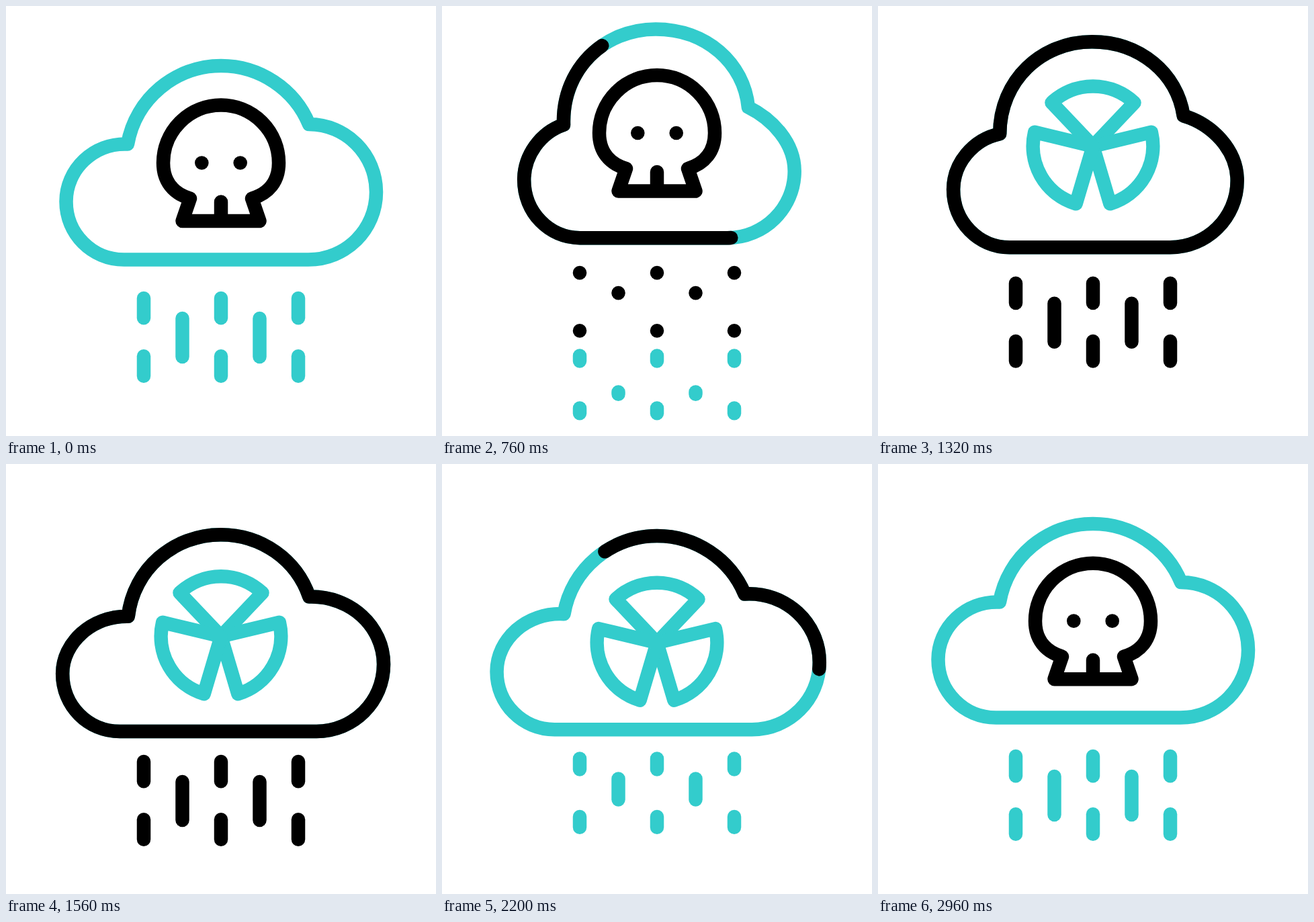
These frames come from a looping animation (640 by 640 pixels, 3000 ms). An HTML page:

```html
<!DOCTYPE html>
<html lang="en">
<head>
<meta charset="utf-8">
<title>Toxic rain</title>
<style>
  html, body { margin: 0; width: 100%; height: 100%; overflow: hidden; background: #fff; }
  svg { display: block; width: 100%; height: 100%; }
  .line { fill: none; stroke-width: 20.5; stroke-linecap: round; stroke-linejoin: round; }
  .teal { stroke: #3cc; }
  .black { stroke: #000; }
</style>
</head>
<body>
<svg viewBox="0 0 640 640">
  <clipPath id="inside"><path class="cloud"/></clipPath>
  <g clip-path="url(#inside)">
    <g id="skull" class="line black">
      <path d="M274 286.5C249 279 234 261 234 233.5A86 86 0 0 1 406 233.5C406 261 391 279 366 286.5L377.5 320H262.5ZM320 291.5V320"/>
      <g fill="#000" stroke="none"><circle cx="291.3" cy="233.5" r="10.3"/><circle cx="348.7" cy="233.5" r="10.3"/></g>
    </g>
    <g id="trefoil" class="line teal">
      <path id="blade" d="M320 235L258.5 170.2A89.5 89.5 0 0 1 381.5 170.2Z"/>
      <use href="#blade" transform="rotate(120 320 235)"/>
      <use href="#blade" transform="rotate(240 320 235)"/>
    </g>
  </g>
  <path class="cloud line teal"/>
  <path id="trace" class="cloud line black" pathLength="1"/>
  <g id="rain"></g>
</svg>
<script>
const LOOP = 3000;
const find = id => document.getElementById(id);
const mix = (a, b, p) => a + (b - a) * p;
const ease = (t, from, to) => {
  const u = Math.min(1, Math.max(0, (t - from) / (to - from)));
  return u * u * (3 - 2 * u);
};

// Cloud outlines share one structure, so their numbers can be blended.
const REST = 'M450 377.5H175.5C128 377.5 89.5 339 89.5 291C89.5 243.5 130 203.5 181 205.5C193 138 252 89 320 89C377 89 429 123 451 176C506 176 551 221 551 277C551 333 506 377.5 450 377.5Z';
const TALL = 'M424 344.3H206C160 344.3 123 306 123 258C123 222 147 188 181 176C178 93 241 33 318 33C394 33 450 84 456 150C491 168 524 203 524 245C524 300 479 344.3 424 344.3Z';
const WIDE = 'M472 412H160C112 412 74 374 74 326C74 278 122 236 182 240C193 173 252 124 320 124C377 124 428 158 450 210C518 203 572 252 572 312C572 368 527 412 472 412Z';
const NUMBER = /[\d.]+/g;

function blend(a, b, p) {
  const goal = b.match(NUMBER);
  let i = 0;
  return a.replace(NUMBER, n => mix(+n, +goal[i++], p).toFixed(2));
}

const squash = t => ease(t, 1138, 1735);
const relax = t => ease(t, 1930, 2480);

function cloudPath(t) {
  if (t < 1000) return blend(REST, TALL, ease(t, 330, 805));
  if (t < 1800) return blend(TALL, WIDE, squash(t));
  return blend(WIDE, REST, relax(t));
}

// Black outline: grows around the cloud, later withdraws.
function drawTrace(t) {
  const early = t < 1500;
  const length = early ? ease(t, 381, 1120) : 1 - ease(t, 1795, 2459);
  const start = early ? 0.073 - 0.000278 * (t - 480) : 0.677 - 0.00041 * (t - 1880);
  const trace = find('trace');
  trace.style.display = length > 0 ? '' : 'none';
  trace.style.strokeDasharray = length < 1 ? `${length} ${1 - length}` : 'none';
  trace.style.strokeDashoffset = -start;
}

function drawIcons(t) {
  const drift = -45 * ease(t, 160, 800) + 84 * squash(t) - 39 * ease(t, 1870, 3000);
  const place = (id, y) => find(id).setAttribute('transform', `translate(0 ${y + drift})`);
  place('skull', t < 1500 ? 255 * ease(t, 846, 1207) : -320 * (1 - ease(t, 2395, 2715)));
  place('trefoil', t < 1500 ? -320 * (1 - ease(t, 980, 1300)) : 255 * ease(t, 2260, 2620));
}

const KINDS = {
  upper: { top: 435, bottom: 464.3, end: 541, start: 430, time: 460 },
  lower: { top: 521.3, bottom: 550.8, end: 617, start: 415, time: 480 },
  middle: { top: 465, bottom: 522, end: 579, start: 417, time: 390 }
};
const SECOND_FALL = 1225;

function addLine(x, color) {
  const line = document.createElementNS('http://www.w3.org/2000/svg', 'path');
  line.setAttribute('class', 'line ' + color);
  find('rain').append(line);
  return (visible, from, to) => line.setAttribute('d', visible ? `M${x} ${from}V${to}` : '');
}

const drops = [205, 262.5, 320, 377.5, 435].flatMap((x, i) =>
  (i % 2 ? ['middle'] : ['upper', 'lower']).map(kind =>
    ({ ...KINDS[kind], teal: addLine(x, 'teal'), black: addLine(x, 'black') })));

function drawDrop(drop, t) {
  const draw = (line, visible, offset, grow, fallStart) => {
    const tail = ease(t, fallStart, fallStart + drop.time);
    const head = ease(t + 12, fallStart, fallStart + drop.time);
    line(visible,
      mix(drop.top + offset, drop.end, tail),
      mix(mix(drop.top, drop.bottom, grow) + offset, drop.end, head));
  };
  const second = drop.start + SECOND_FALL;
  if (t < 1500) draw(drop.teal, t < drop.start + drop.time, 0, 1, drop.start);
  else draw(drop.teal, t > 1989, 7 * (1 - relax(t)), ease(t, 1989, 2389), LOOP * 2);
  draw(drop.black, t > 744 && t < second + drop.time,
    mix(-38, 10, ease(t, 1133, 1620)), ease(t, 744, 1142), second);
}

function render(now) {
  const t = now % LOOP;
  const outline = cloudPath(t);
  document.querySelectorAll('.cloud').forEach(path => path.setAttribute('d', outline));
  drawTrace(t);
  drawIcons(t);
  drops.forEach(drop => drawDrop(drop, t));
}

let began;
function tick(now) {
  began ??= now;
  render(now - began);
  requestAnimationFrame(tick);
}
render(0);
requestAnimationFrame(tick);
</script>
</body>
</html>
```
